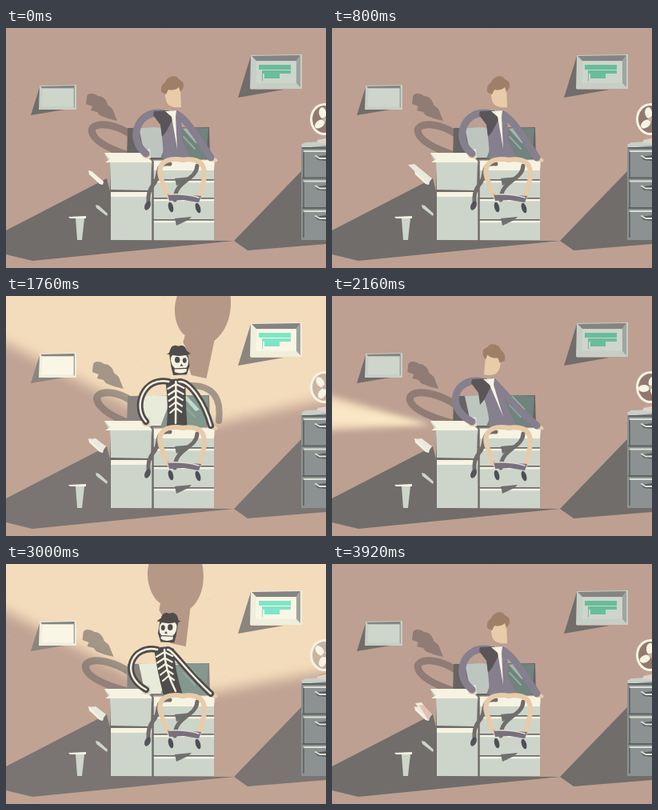
These frames come from a looping animation (400 by 300 pixels, 4000 ms). An HTML page with a canvas:

```html
<!DOCTYPE html>
<html lang="en">
<head>
<meta charset="utf-8">
<title>Office copier</title>
<style>
html, body { margin: 0; width: 100%; height: 100%; overflow: hidden; background: #bda091; }
canvas { display: block; width: 400px; height: 300px; }
</style>
</head>
<body>
<canvas id="stage" width="400" height="300"></canvas>
<script>
const ctx = document.getElementById('stage').getContext('2d');
const LOOP = 4000, STEP = 40;
const C = {
  wall: '#bda091', lit: '#f3dcbb', shade: '#716d6b', steel: '#cdd5ca', cream: '#f7f3e2',
  suit: '#867f8e', dark: '#5a5559', skin: '#e8cba9', hair: '#a07f69', bone: '#f6f2e2', black: '#504c4b'
};

const clamp = v => Math.max(0, Math.min(1, v));
const mix = (a, b, u) => a + (b - a) * u;
const ramp = (t, from, to) => {
  const u = clamp((t - from) / (to - from));
  return u * u * (3 - 2 * u);
};
const hold = (t, from, to, fade) => ramp(t, from, from + fade) * ramp(to - t, 0, fade);

function pose(t) {
  const right = hold(t, 1040, 1880, 300), left = hold(t, 1660, 3240, 340);
  return {
    d: 24 * right - 10 * left,
    x: 208 + 27 * right - 6 * left,
    y: 80 + 2 * right,
    facing: t > 1840 && t < 3040 ? -1 : 1
  };
}

// The light opens from the right, floods the wall and closes to the left.
function scan(t) {
  const first = t < 2300;
  const u = first ? (t - 1080) / 1160 : (t - 2420) / 1380;
  const open = clamp(u * 4), shut = ramp(u, .72, .92);
  return {
    power: clamp(Math.min(u * 30, (1 - u) * 18)),
    lo: 6 + 8 * clamp(u / .7) + 150 * shut,
    hi: mix(mix(12, 153, open), 183, shut),
    loX: mix(257, 124, shut),
    hiX: mix(mix(256, 200, open), 124, shut)
  };
}

function fill(color, d) {
  ctx.fillStyle = color;
  ctx.fill(new Path2D(d));
}
function line(color, width, d) {
  ctx.strokeStyle = color;
  ctx.lineWidth = width;
  ctx.stroke(new Path2D(d));
}
const poly = (color, pts) => fill(color, 'M' + pts + 'Z');
function oval(color, x, y, rx, ry, turn = 0) {
  ctx.fillStyle = color;
  ctx.beginPath();
  ctx.ellipse(x, y, rx, ry, turn, 0, 7);
  ctx.fill();
}
function box(color, x, y, w, h) {
  ctx.fillStyle = color;
  ctx.fillRect(x, y, w, h);
}
function at(x, y, draw, sx = 1, turn = 0) {
  ctx.save();
  ctx.translate(x, y);
  ctx.rotate(turn);
  ctx.scale(sx, 1);
  draw();
  ctx.restore();
}

function grain() {
  let seed = 7;
  const rnd = () => (seed = seed * 16807 % 2147483647) / 2147483647;
  for (let i = 0; i < 90; i++)
    box(i % 3 ? 'rgba(235,215,200,.13)' : 'rgba(110,85,75,.1)', rnd() * 400, rnd() * 300, 1 + rnd(), 1);
}

function wedge(color, soft, light, inset) {
  const pts = [[light.loX, 161]];
  for (let i = 0; i <= 6; i++) {
    const a = mix(light.lo + inset, light.hi - inset, i / 6) * Math.PI / 180;
    pts.push([mix(light.loX, light.hiX, i / 6) + 700 * Math.cos(a), 161 - 700 * Math.sin(a)]);
  }
  pts.push([light.hiX, 161]);
  ctx.filter = `blur(${soft}px)`;
  poly(color, pts.join(' '));
}
function beam(light) {
  if (!light.power) return;
  const wide = light.hi - light.lo > 60;
  ctx.save();
  ctx.globalAlpha = light.power;
  wedge(C.lit, wide ? 8 : 4, light, 0);
  if (!wide) wedge('rgba(255,238,206,.6)', 3, light, (light.hi - light.lo) * .25);
  ctx.restore();
}

function castShadow(d) {
  const k = d * .0065;
  ctx.save();
  ctx.transform(1, 0, -k, 1, 232 + d * 2.15 + 50 * k, 0);
  fill('#b69887', 'M-32,-5 C-42,18 -32,43 -22,49 L-24,58 -20,65 -22,72 -12,99 7,103 15,56 C31,43 37,20 32,-5Z');
  ctx.restore();
}

function wallShadow(p, flood) {
  const x = p.d, color = flood ? 'rgba(116,108,104,.62)' : '#907c74';
  line(color, 9, `M${168 + x * .4},143 C${140 + x},115 ${101 + x},116 ${108 + x},132 Q${115 + x},148 163,162`);
  if (flood && x > 5) line(color, 8, `M${225 + x},112 Q${265 + x},112 266,156`);
  at(119 + (p.x - 208) * .95, 99, () =>
    fill(color, 'M-18,-13 C-17,-19 -8,-17 -4,-14 C3,-14 7,-8 8,-3 L14,2 20,17 8,14 -2,10 -5,6 -13,4 -11,-1 -19,-4Z'));
}

function picture(x, y, w, h, rim, flood) {
  const edge = flood ? '#f0eedc' : '#c6cec5', n = rim * .9;
  poly(edge, [x, y, x + w, y - 1, x + w, y + h, x - 1, y + h]);
  poly('#848482', [x + 1, y + 1, x + w - 2, y, x + w - n, y + n, x + n, y + n]);
  poly('#a0a49e', [x + w - n, y + n, x + w - 2, y, x + w - 2, y + h - 2, x + w - n, y + h - n]);
  poly(flood ? '#faf6e5' : '#ced5ca', [x + n, y + n, x + w - n, y + n, x + w - n, y + h - n, x + n - 1, y + h - n]);
}
function pictures(flood) {
  const shade = flood ? '#8b8580' : C.shade, green = flood ? '#7ee6c6' : '#69bd9b';
  poly(shade, '42,74 31,109 73,102 42,102');
  picture(42, 72, 46, 30, 4, flood);
  poly(shade, '306,35 290,87 347,77 306,77');
  picture(306, 34, 64, 42, 8, flood);
  box(green, 316, 46, 40, 6);
  box(green, 320, 53, 36, 4);
  box(green, 323, 57, 19, 6);
  line(green, 1, 'M320.5,54V66');
}

function rightCabinet(t, flood) {
  box('#8b9291', 369, 146, 31, 119);
  poly('#c9cfc6', '369,146 374,143 400,142 400,147 370,150');
  for (let i = 0; i < 3; i++) {
    const y = 152 + i * 37.5;
    line('#5d6162', 2, `M371,${y - 2}H400`);
    line('#dcdfd3', 2, `M373,${y + 2}H400`);
    line('#666a6a', 2, `M372,${y + 4}v30`);
    poly('#595d5e', [386, y + 9, 400, y + 7, 400, y + 14, 390, y + 13]);
    line('#dee1d5', 2, `M387,${y + 8}l5,3H400`);
  }
  poly('#ded3c8', '388,143 391,138 400,136 400,145');
  line('#b98578', 1, 'M391,139L400,137');
  oval(C.cream, 398, 114, 18, 20);
  oval(flood ? '#c9b3a0' : '#92796f', 398, 114, 15, 17);
  at(398, 114, () => {
    for (let i = 0; i < 3; i++) {
      ctx.rotate(Math.PI * 2 / 3);
      oval(C.cream, 8, 2, 7, 4.5, .4);
    }
  }, 1, t / LOOP * Math.PI * 30);
  oval('#c4b0a2', 398, 114, 2.5, 2.5);
}

function sheet(color, x, y, reach) {
  poly(color, [mix(122, x, reach), mix(188, y, reach), mix(123, x + 8, reach), mix(187, y - 1, reach), 125, 188, 120, 195]);
}
function tray(t) {
  poly(C.cream, '103,178 107,179 122,192 121,196 117,195 104,183');
  poly(C.steel, '112,221 116,222 127,232 126,235 113,225');
  const fall = ramp(t, 920, 1240);
  if (t >= 640) sheet('#e9eadd', mix(95, 104, fall), mix(171, 179, fall), ramp(t, 640, 800));
  const next = ramp(t, 3760, 3920);
  if (next) {
    sheet('#f1e9dc', 104, 174, next);
    sheet('rgba(205,140,130,.45)', 106, 174, next * .8);
  }
  poly(C.steel, '87,238 98,238 95,265 89,265');
  poly(C.cream, '78,236 100,235 100,238 80,238');
}

function desk() {
  box(C.shade, 130, 164, 54, 101);
  poly(C.steel, '123,157 171,156 182,166 181,203 131,202 130,169');
  poly(C.cream, '123,156 170,156 173,160 181,165 181,168 124,168 130,164');
  box(C.steel, 131, 206, 52, 59);
  box(C.cream, 131, 205, 52, 6);
  box(C.steel, 184, 166, 76, 99);
  poly(C.cream, '181,166 261,165 260,178 184,178');
  for (const y of [190, 213, 240]) {
    line(C.shade, 2, `M184,${y}H259`);
    line(C.cream, 2.5, `M184,${y + 2}H259`);
    if (y !== 213) poly('#6e716f', [211, y - 2, 232, y - 4, 228, y, 213, y + 7]);
  }
  line(C.shade, 2.5, 'M183.5,167V265');
}

function copier(flood) {
  poly(flood ? '#88837f' : '#686463', '152,125 254,124 255,164 151,165');
  poly(flood ? '#e8ebda' : '#bdc6be', '166,125 184,124 240,126 250,162 174,162');
  poly(flood ? '#83988e' : '#70837d', '207,127 226,124 253,125 250,164 193,163');
  poly(flood ? '#c2dacb' : '#a2b6ad', '221,126 226,125 242,142 237,144');
  line('#93a99f', 2, 'M222,136L236,151');
  poly('#dde1d3', '169,153 180,151 181,163 171,163');
}

function legs() {
  line(C.shade, 5, 'M205,170 C184,168 194,187 184,196 Q177,204 178,218');
  line(C.shade, 5, 'M239,172 C238,191 211,190 211,215');
  oval('#56545a', 177, 222, 3.5, 6, .4);
  line(C.skin, 6, 'M222,165 C194,160 188,175 195,191 Q198,203 205,212');
  line(C.skin, 6, 'M220,165 C255,160 251,185 241,212');
  poly('#77707f', '202,207 244,210 241,218 222,215 204,216');
  line('#e3dbcd', 1.5, 'M203,208Q224,207 241,212');
  oval('#4f4e57', 206, 224, 3, 6.5, -.25);
  oval('#4f4e57', 240, 225, 3, 6.5, -.3);
}

function arms(d, color, width) {
  line(color, width, `M${197 + d},107 C${166 + d},100 ${150 + d * 1.2},138 175,157`);
  line(color, width, `M${210 + d},107 C${220 + d * 1.6},106 ${238 + d * 1.6},134 256,162`);
}

function suit(d) {
  const s = 206 + d;
  fill(C.suit, `M${s - 15},105 L${s + 8},103 Q${s + 15},112 220,140 L231,163 197,164 Q196,137 ${s - 15},105Z`);
  arms(d, C.suit, 9);
  fill(C.dark, `M${s - 21},104 L${s - 3},103 ${s + 5},109 ${s - 6},130 ${s - 11},136 ${s - 13},121 ${s - 22},109Z`);
  poly(C.cream, [s - 7, 104, s + 7, 103, s + 6, 111, 214, 151, s + 1, 111]);
}

function bones(d) {
  const s = 206 + d;
  fill(C.black, `M${s - 13},106 Q${s},101 ${s + 12},106 Q${s + 12},130 ${224 + d * .4},163 L${199 + d * .3},163 Q${s - 9},135 ${s - 13},106Z`);
  arms(d, C.black, 8);
  arms(d, C.bone, 2.5);
  const spine = u => mix(s, 212, u * u);
  line(C.bone, 2.5, `M${s},107 Q${s},132 212,159`);
  for (let u = 0; u < .75; u += .15) {
    const x = spine(u), y = 110 + u * 50, w = 10 - 5 * u;
    line(C.bone, 2.2, `M${x - w},${y + 6}L${x},${y}L${x + w},${y + 5}`);
  }
}

function head() {
  fill(C.skin, 'M-10,-8 L10,-9 11,19 Q4,20 -1,18 Q-9,16 -9,2Z');
  fill(C.hair, 'M-14,0 Q-15,-9 -9,-12 C-6,-21 6,-22 8,-16 C13,-13 16,-11 13,-4 L10,0 8,-6 Q3,-1 -5,-3 L-8,3Z');
}

function skull() {
  fill(C.black, 'M-12,-10 L11,-10 13,7 9,18 -8,18 -10,8Z');
  fill(C.bone, 'M-10,-4 Q-7,-11 5,-9 Q14,-5 11,6 L9,9 9,14 Q3,18 -6,14 L-6,9 Q-11,4 -10,-4Z');
  oval(C.black, -2, -1, 3.2, 3.8);
  oval(C.black, 7, 0, 2.5, 3.3);
  poly(C.black, '3,4 5,7 1,7');
  line(C.black, 1.2, 'M-6,10L9,10');
  fill(C.black, 'M-17,-9 Q-12,-8 -11,-13 Q-8,-22 0,-18 Q8,-21 10,-12 L15,-8 Q4,-4 -7,-7Z');
}

function draw(t) {
  const p = pose(t), light = scan(t);
  const flood = light.power > .5 && light.hi - light.lo > 85;
  const floor = flood ? '#7a7572' : C.shade;

  box(flood ? '#c0a393' : C.wall, 0, 0, 400, 300);
  beam(light);
  if (flood) castShadow(p.d);
  grain();
  poly(floor, '0,253 126,188 145,265 285,266 33,291 0,283');
  poly(floor, '285,266 369,179 370,265 400,265 400,270 302,278');
  wallShadow(p, flood);
  pictures(flood);
  rightCabinet(t, flood);
  tray(t);
  copier(flood);
  desk();
  oval(C.skin, 175, 159, 5, 4);
  oval(C.skin, 258, 164, 7, 3, .3);
  (flood ? bones : suit)(p.d);
  legs();
  at(p.x, p.y, flood ? skull : head, p.facing, -p.d * .006);
}

ctx.lineCap = 'round';
ctx.lineJoin = 'round';
const start = performance.now();
function tick() {
  const t = (performance.now() - start) % LOOP;
  draw(Math.min(3920, Math.floor(t / STEP) * STEP));
  requestAnimationFrame(tick);
}
tick();
</script>
</body>
</html>
```
